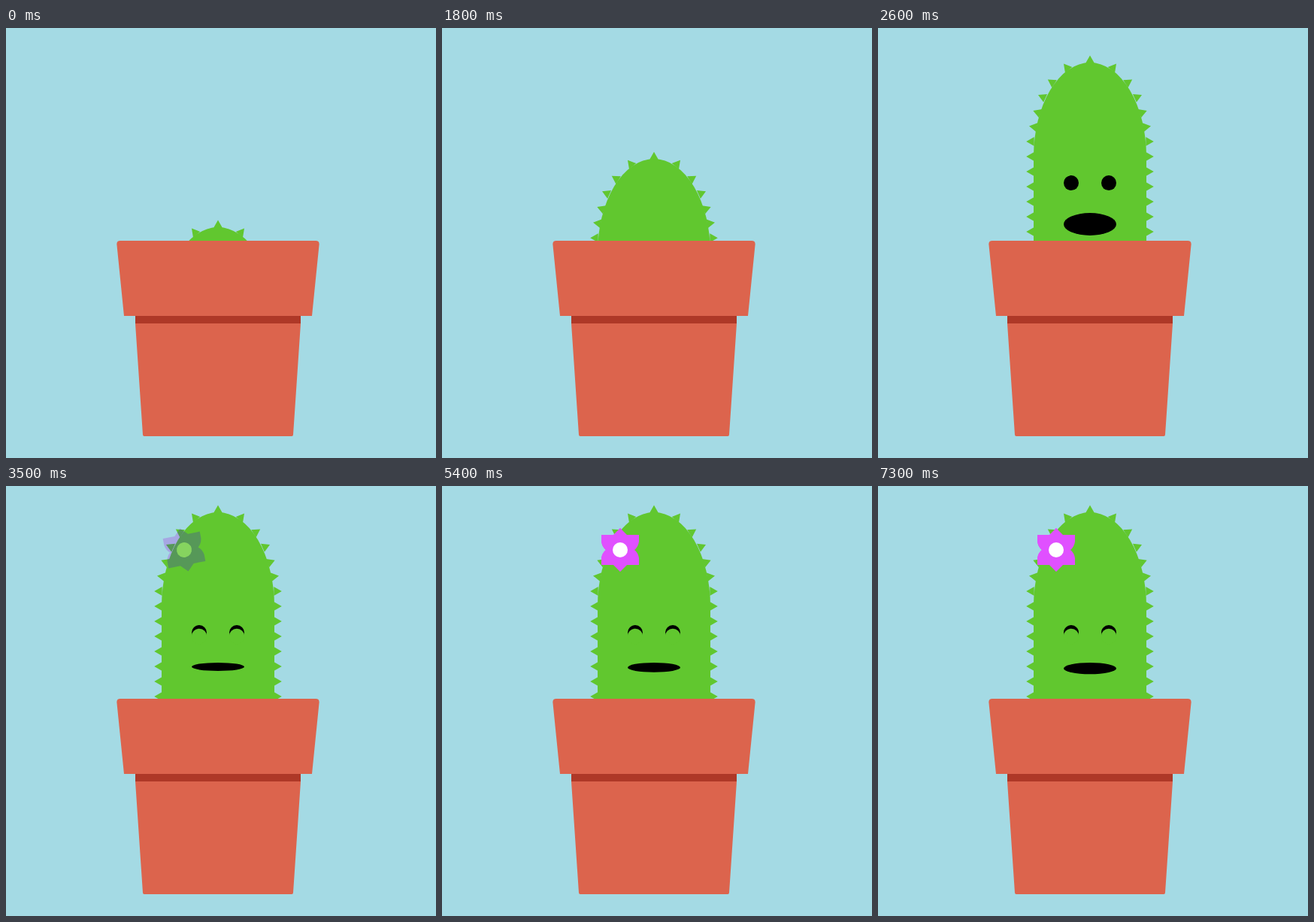
These frames come from a looping animation (572 px wide and 572 px high, 7400 ms). An HTML page:

```html
<!DOCTYPE html>
<html lang="en">
<head>
<meta charset="utf-8">
<title>Growing cactus</title>
<style>
html, body { margin: 0; width: 100%; height: 100%; overflow: hidden; background: #a4dae4; }
svg { display: block; width: 100vw; height: 100vh; }
</style>
</head>
<body>
<svg viewBox="0 0 572 572">
  <defs>
    <path id="body" d="M207 285V160A75 125 0 0 1 357 160V285Z"/>
    <path id="spikes"/>
    <path id="petals" d="M0-29L9-20H25V-11Q24-4 19 0Q24 4 25 11V20H9L0 29L-9 20H-25V11Q-24 4-19 0Q-24-4-25-11V-20H-9Z"/>
    <clipPath id="skin"><use href="#body"/><use href="#spikes"/></clipPath>
  </defs>
  <rect width="572" height="572" fill="#a4dae4"/>
  <g id="cactus">
    <g class="flower"><use class="spin" href="#petals"/><circle r="10" fill="#fff"/></g>
    <g fill="#61c72f"><use href="#spikes"/><use href="#body"/></g>
    <g id="face">
      <circle cx="257" cy="195" r="10"/>
      <circle cx="307" cy="195" r="10"/>
      <g id="lids" fill="#61c72f">
        <circle cx="257" cy="200" r="10.3"/>
        <circle cx="307" cy="200" r="10.3"/>
      </g>
      <ellipse id="mouth" cx="282" rx="35"/>
    </g>
    <g id="front"><g class="flower"><use class="spin" href="#petals"/><circle r="10" fill="#fff"/></g></g>
  </g>
  <g fill="#dc644d">
    <path d="M172 393H392L382 541Q382 543 380 543H184Q182 543 182 541Z"/>
    <path d="M152 283H412Q417 283 416.6 288L407 383H157L147.4 288Q147 283 152 283Z"/>
  </g>
  <rect x="172" y="383" width="220" height="10" fill="#ae3827"/>
</svg>
<script>
const LOOP = 7400, STEP = 100, LEAD = 342;
const $ = id => document.getElementById(id);
const all = sel => [...document.querySelectorAll(sel)];
const clamp = v => Math.min(1, Math.max(0, v));

// Cubic Bezier easing with control points (x1, 0) and (x2, 1)
function ease(p, x1, x2) {
  p = clamp(p);
  if (p === 0 || p === 1) return p;
  let lo = 0, hi = 1, u;
  for (let i = 0; i < 30; i++) {
    u = (lo + hi) / 2;
    const x = 3 * x1 * u * (1 - u) ** 2 + 3 * x2 * u * u * (1 - u) + u ** 3;
    if (x < p) lo = u; else hi = u;
  }
  return 3 * u * u - 2 * u ** 3;
}
const easeIn = p => ease(p, 0.42, 1);
const easeInOut = p => ease(p, 0.42, 0.58);

// Triangle with its tip at (x, y), leaning `deg` from upright
function spike(x, y, deg) {
  const a = deg * Math.PI / 180, s = Math.sin(a), c = Math.cos(a);
  const at = (w, h) => `${(x + w * c - h * s).toFixed(2)} ${(y + w * s + h * c).toFixed(2)}`;
  return `M${x} ${y}L${at(6, 10.5)}L${at(-6, 10.5)}Z`;
}

function buildSpikes() {
  const left = [[247, 36.5, 39], [225.8, 57.5, 57], [213, 78, 66], [206.3, 98.8, 69], [201, 119.5, 81]];
  for (let y = 140; y <= 280; y += 20) left.push([197.2, y, 90]);
  const pairs = left.map(([x, y, d]) => spike(x, y, -d) + spike(564 - x, y, d));
  $("spikes").setAttribute("d", spike(282, 25.5, 0) + pairs.join(""));
}

const petalColor = (red, a) =>
  `rgb(${red + (224 - red) * a}, ${80 * a * a}, ${215 + 40 * a})`;

function draw(ms) {
  const s = (ms + LEAD) / 1000;
  const rise = 230 * (1 - easeIn((s - 1) / 2));
  $("cactus").setAttribute("transform", `translate(0 ${rise})`);

  const phase = s % 2;
  const h = 10 + 20 * easeInOut(phase < 1 ? phase : 2 - phase);
  $("mouth").setAttribute("cy", 235 + h / 2);
  $("mouth").setAttribute("ry", h / 2);
  const open = phase >= 0.5 && phase < 1.5;
  $("lids").setAttribute("visibility", open ? "hidden" : "visible");

  const bloom = easeIn((s - 3) / 2);
  for (const f of all(".flower")) {
    f.setAttribute("transform", `translate(237 85) rotate(${720 * bloom})`);
    f.setAttribute("opacity", bloom);
  }
  const [back, front] = all(".spin");
  back.setAttribute("fill", petalColor(160, bloom));
  front.setAttribute("fill", petalColor(0, bloom));
  $("front").setAttribute("clip-path", bloom < 1 ? "url(#skin)" : "none");
}

buildSpikes();
const start = performance.now();
function tick() {
  const t = (performance.now() - start) % LOOP;
  draw(Math.floor(t / STEP) * STEP);
  requestAnimationFrame(tick);
}
tick();
</script>
</body>
</html>
```
